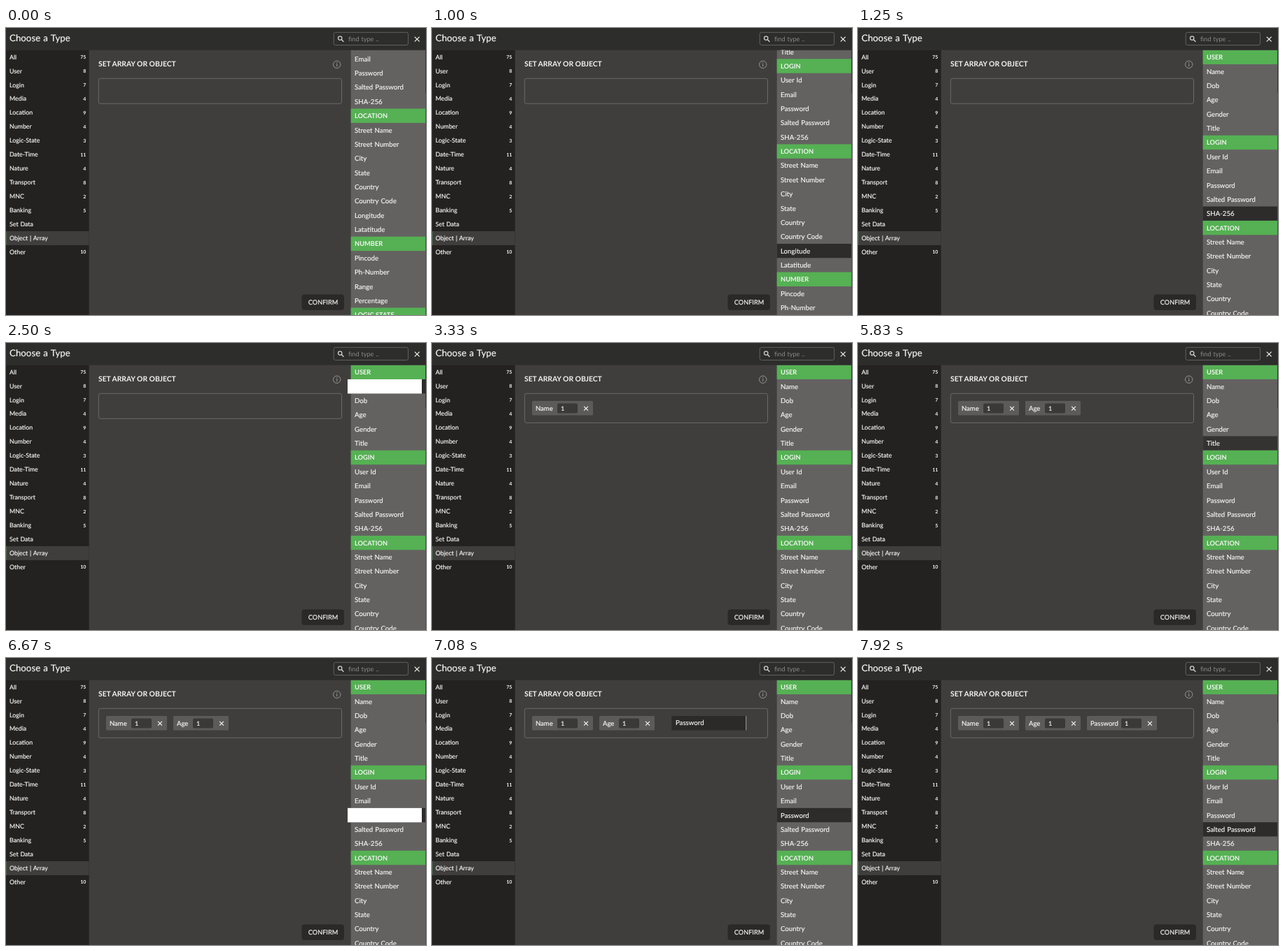
Write an HTML page that moves like this. It is 600x411 px and loops after 8000 ms.

```html
<!DOCTYPE html>
<html lang="en">
<head>
<meta charset="utf-8">
<title>Choose a Type</title>
<style>
html, body { margin: 0; width: 100%; height: 100%; overflow: hidden; background: #403e3d; }
svg { display: block; width: 600px; height: 411px; font-family: Lato, "Open Sans", sans-serif; text-rendering: geometricPrecision; }
text { fill: #f4f4f3; stroke: #f4f4f3; stroke-width: .18px; word-spacing: .06em; }
.bold { font-weight: 700; stroke: none; word-spacing: 0; }
.hint { fill: #8b8a88; stroke: none; }
</style>
</head>
<body>
<svg id="stage" viewBox="0 0 600 411"></svg>
<script>
const LOOP = 8000, TICK = 1000 / 12, PITCH = 20.36, TOP = 31.6;
const LIST_X = 492.7, LIST_W = 106.5;
const stage = document.getElementById('stage');

function add(parent, tag, attrs, content) {
  const el = document.createElementNS('http://www.w3.org/2000/svg', tag);
  for (const k in attrs) el.setAttribute(k, attrs[k]);
  if (content !== undefined) el.textContent = content;
  parent.append(el);
  return el;
}
const group = parent => add(parent, 'g', {});
const box = (p, x, y, width, height, fill, more) =>
  add(p, 'rect', { x, y, width, height, fill, ...more });
const label = (p, x, y, size, content, more) =>
  add(p, 'text', { x, y, 'font-size': size, ...more }, content);
const line = (p, d, stroke, width) =>
  add(p, 'path', { d, stroke, 'stroke-width': width });
const ring = (cx, cy, r, stroke, width) =>
  add(stage, 'circle', { cx, cy, r, fill: 'none', stroke, 'stroke-width': width });
const cross = (p, x, y, r) =>
  line(p, `M${x - r} ${y - r}l${2 * r} ${2 * r}m0 ${-2 * r}l${-2 * r} ${2 * r}`, '#f4f4f3', 1.2);
const show = (el, on) => el.setAttribute('visibility', on ? 'visible' : 'hidden');
const rowY = i => TOP + i * PITCH;

// Types by section; headings are the rows in capitals.
const rows = ['USER', 'Name', 'Dob', 'Age', 'Gender', 'Title',
  'LOGIN', 'User Id', 'Email', 'Password', 'Salted Password', 'SHA-256',
  'LOCATION', 'Street Name', 'Street Number', 'City', 'State', 'Country', 'Country Code', 'Longitude', 'Latatitude',
  'NUMBER', 'Pincode', 'Ph-Number', 'Range', 'Percentage', 'LOGIC STATE'];
const isHeading = i => /^[A-Z ]+$/.test(rows[i]);

box(stage, 0, 0, 600, 411, '#403e3d');
box(stage, LIST_X, TOP, LIST_W, 380, '#646261');
const list = group(stage);
const hoverBar = box(list, LIST_X, 0, LIST_W, PITCH, '#2d2c2b');
rows.forEach((name, i) => {
  const y = rowY(i);
  if (isHeading(i)) {
    box(list, LIST_X, y, LIST_W, PITCH, '#55b153');
    label(list, 498, y + 13.6, 9.3, name, { class: 'bold' });
  } else label(list, 498, y + 13.7, 9.7, name);
});
box(stage, 599, 32, 1, 379, '#51504e');
box(stage, 599, 32, 1, 61, '#343332');

// Header
box(stage, 0, 0, 600, TOP, '#2d2d2b');
label(stage, 5, 19.2, 13.3, 'Choose a Type');
box(stage, 468.2, 6.3, 106.4, 18.2, 'none', { rx: 2.5, stroke: '#626160' });
ring(477.2, 14.6, 2.7, '#d4d3d2', 1.2);
line(stage, 'M479.2 16.6L482.4 19.8', '#d4d3d2', 1.4);
label(stage, 489, 18.6, 9.2, 'find type ..', { class: 'hint' });
cross(stage, 587.2, 16, 3.4);

// Sidebar
const menu = { All: 75, User: 8, Login: 7, Media: 4, Location: 9, Number: 4, 'Logic-State': 3, 'Date-Time': 11,
  Nature: 4, Transport: 8, MNC: 2, Banking: 5, 'Set Data': '', 'Object | Array': '', Other: 10 };
box(stage, 0, TOP, 118.6, 380, '#232221');
box(stage, 0, 291, 118.6, 20, '#403e3d');
box(stage, 0, 291, 1, 20, '#4a5f4a');
Object.entries(menu).forEach(([name, count], i) => {
  const y = 44.7 + i * 19.93;
  label(stage, 5, y, 8.85, name);
  label(stage, 114.3, y - 0.4, 7, count, { 'text-anchor': 'end', class: 'bold' });
});

// Main panel
label(stage, 132, 55, 10.3, 'SET ARRAY OR OBJECT', { class: 'bold' });
ring(472.7, 52.3, 5.2, '#979694', 1);
line(stage, 'M472.7 51.4v3.6M472.7 49.2v1.2', '#979694', 1.1);
const field = box(stage, 132.3, 72.3, 347.2, 36, 'none', { rx: 2.5, stroke: '#6b6a68' });
box(stage, 422.5, 381.5, 60.5, 22.5, '#2a2928', { rx: 4 });
label(stage, 431.8, 396, 9.2, 'CONFIRM');

// Each drag lifts a list row at `start` and leaves a chip DRAG ticks later.
const DRAG = 9;
const drags = [
  { name: 'Name', width: 87, start: 30 },
  { name: 'Age', width: 79, start: 54 },
  { name: 'Password', width: 100, start: 80 }
];
let chipX = 143;
for (const d of drags) {
  const g = d.chip = group(stage), end = chipX + d.width;
  d.x = chipX;
  d.drop = d.start + DRAG;
  d.row = rows.indexOf(d.name);
  box(g, d.x, 83, d.width, 20.6, '#5d5b5a', { rx: 1.5 });
  label(g, d.x + 5, 96.8, 9.5, d.name);
  box(g, end - 51, 86.5, 29, 14, '#3b3938', { rx: 2 });
  label(g, end - 46, 96.8, 9, '1');
  cross(g, end - 10, 93.8, 2.9);
  chipX = end + 9;
}
const ghost = group(stage);
const ghostBack = box(ghost, 0, 0, 106, 20.5, '#2b2a29');
const ghostEdge = box(ghost, 106, 0, 0.8, 20.5, '#b9b8b7');
const ghostText = label(ghost, 5.6, 13.4, 9.7, '');

// Pointer over the list: [first tick, last tick, first row, last row]
const glides = [[7, 9, 20, 19], [14, 17, 11, 11], [17, 21, 11, 3], [24, 26, 2, 1], [50, 51, 2, 3], [70, 76, 5, 9], [91, 93, 7, 10]];

const clamp = u => Math.min(1, Math.max(0, u));
const mix = (a, b, u) => a + (b - a) * u;
const smoother = u => u * u * u * (10 - 15 * u + 6 * u * u);

function hovered(tick) {
  const glide = glides.findLast(g => g[0] <= tick);
  if (!glide) return -1;
  const [first, last, from, to] = glide;
  if (drags.some(d => d.drop > last && tick > d.drop)) return -1;
  const row = Math.round(mix(from, to, clamp((tick - first) / (last - first))));
  return isHeading(row) ? -1 : row;
}

function draw(time) {
  const tick = Math.floor((time % LOOP + 5) / TICK) % 96;

  const scroll = 160.4 * (1 - smoother(clamp((tick - 10) / 5)));
  list.setAttribute('transform', `translate(0 ${-scroll})`);

  const row = hovered(tick);
  show(hoverBar, row >= 0);
  hoverBar.setAttribute('y', rowY(row));
  hoverBar.setAttribute('fill', row === hovered(tick - 1) ? '#2d2c2b' : '#353332');

  drags.forEach(d => show(d.chip, tick >= d.drop));
  field.setAttribute('height', tick >= drags[0].drop ? 42 : 36);

  const drag = drags.find(d => tick >= d.start && tick < d.drop);
  ghost.setAttribute('display', drag ? 'inline' : 'none');
  if (drag) {
    const fresh = tick === drag.start;
    const u = smoother(clamp((tick - drag.start) / 6));
    ghost.setAttribute('transform', `translate(${mix(488, drag.x + 10, u)} ${mix(rowY(drag.row), 78.2, u)})`);
    ghostBack.setAttribute('fill', fresh ? '#fff' : '#2b2a29');
    show(ghostEdge, !fresh);
    show(ghostText, !fresh);
    ghostText.textContent = drag.name;
  }
}

const start = performance.now();
function loop() {
  draw(performance.now() - start);
  requestAnimationFrame(loop);
}
loop();
</script>
</body>
</html>
```
